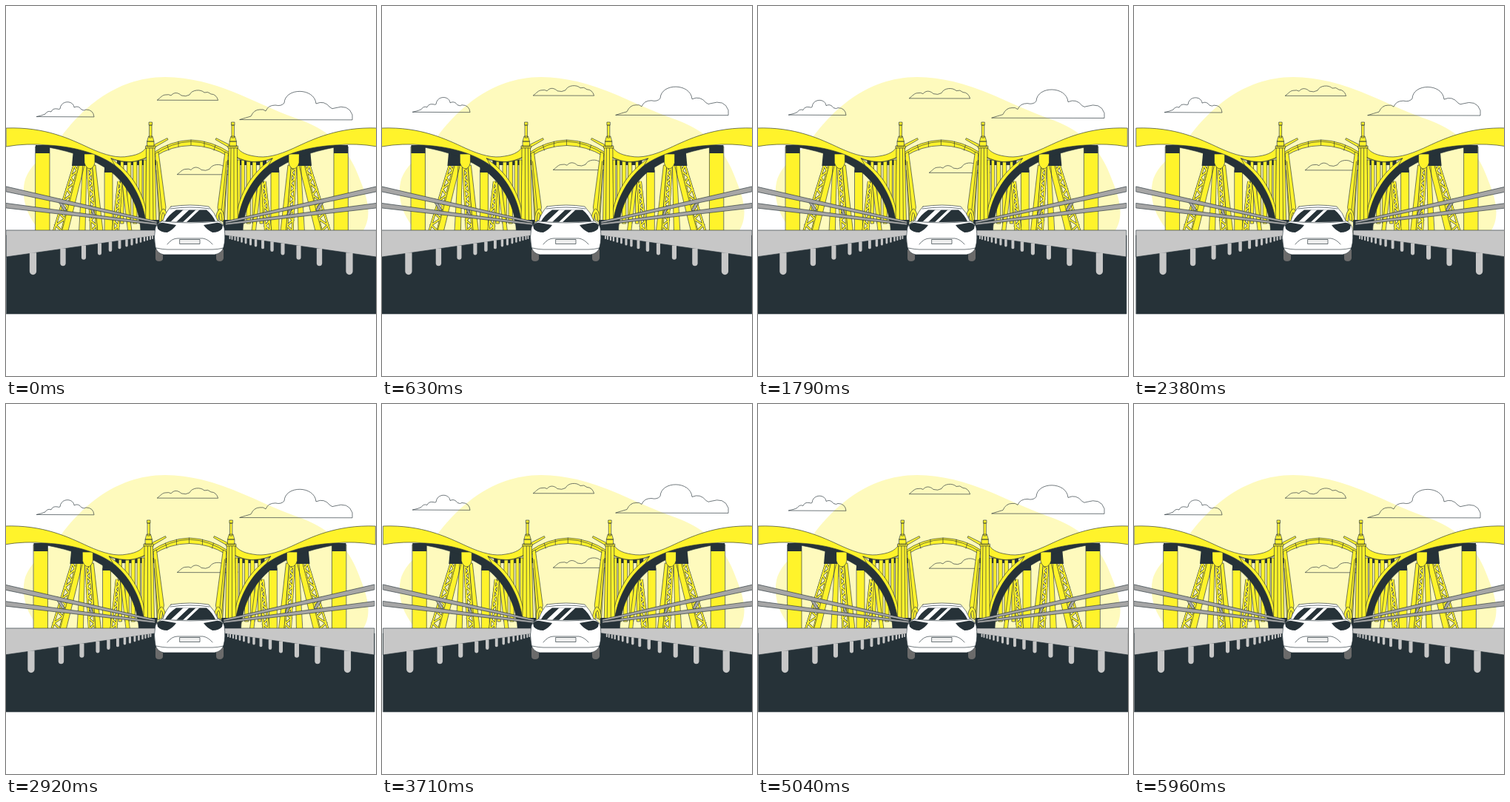
Recreate the animation shown at these times as an HTML page. Size 500x500 px, loop 6 s.

```html
<!DOCTYPE html>
<html lang="en">
<head>
<meta charset="utf-8">
<title>Bridge drive</title>
<style>
  html, body { margin: 0; width: 100%; height: 100%; overflow: hidden; background: #fff; }
  svg { display: block; width: 100vw; height: 100vh; }
  .line { stroke: #263238; stroke-width: .65; stroke-linejoin: round; stroke-linecap: round; }
  .y { fill: #fff32b; }
  .d { fill: #263238; }
  .g { fill: #c7c7c7; }
  .r { fill: #a6a6a6; }
  .n { fill: none; }
</style>
</head>
<body>
<svg viewBox="0 0 500 500">
  <defs>
    <g id="side">
      <!-- hangers beside the tower -->
      <path class="d" d="M150 208H203V215H150Z"/>
      <g id="hangers" class="y line"></g>
      <path class="y line" d="M202 199L206 197L216 272L213 290H207Z"/>
      <path class="line n" d="M204 210L211 280M203 222L208 285"/>
      <path class="y line" d="M207 291Q207 276 213 274Q218 277 219 291H215Q215 280 212 279Q210 282 210 291Z"/>
      <!-- pillars and trusses -->
      <path class="y line" d="M40 190H59V304H40ZM133.500 222H144V304H133.500Z"/>
      <path class="d" d="M40 188H59V199H40ZM133 214H144.500V225H133Z"/>
      <g id="trusses"></g>
      <path class="y line" d="M104 215H109L107 304H99ZM99 215H106L84 304H76Z"/>
      <path class="y line" d="M117 215H121L131 304H124ZM157 236H161L170 304H165Z"/>
      <path class="d" d="M91 194L110 198L107 216H89Z"/>
      <path class="d line" d="M58 188C92 188 125 199 148 216C174 236 190 268 191 304H182C181 272 164 242 142 224C119 207 90 197 58 191Z"/>
      <path class="y line" d="M106 200H120V212Q118 220 113 220Q108 219 106 212Z"/>
      <!-- main band -->
      <path class="y line" d="M.5 165C53 163 87 180 113 192C135 202 151 206 166 203C180 201 188 196 191 188L201 193Q196 206 176 210Q160 212 142 206L151 213C177 234 191 264 193 302H190C188 267 172 235 147 215C122 198 91 190 57 188Q28 185 .500 190Z"/>
      <path class="line n" d="M142 206L147 215M142 206Q165 218 195 202"/>
      <!-- tower -->
      <path class="y line" d="M190 190H201L203 290H189Z"/>
      <path class="line n" d="M194 192V290M198 192L199 290"/>
      <path class="y line" d="M199 188L218 178.500L219 180.500L201 191Z"/>
      <path class="y line" d="M194 161H197V178H194ZM193.500 157H197.500V161H193.500ZM193 176H198L200 183H191ZM191 183H200V190H191ZM189 189H202V192H189Z"/>
    </g>
    <g id="rail">
      <path class="d" d="M184 289H207V311H184Z"/>
      <path class="r line" d="M69 261L73 261L82 276L79 277ZM113 270L116 270L121 283H118Z"/>
      <path class="r line" d="M.5 244L204 291V293.500L.5 251Z"/>
      <path class="r line" d="M.5 266.500L204 293.500V296L.5 273Z"/>
      <path class="g line" d="M.5 303H207V309.500L.5 339Z"/>
      <g id="posts" class="g"></g>
    </g>
    <path id="wisp" class="line n" d="M204.500 127C209 124 211 120 216 120Q220 119 223 121C228 115 234 118 237 121Q243 123 248 120C251 113 263 112 268 117Q273 115 277 119Q284 119 286.500 127Z"/>
    <clipPath id="glass"><path d="M230 275.500H271Q279 282 283 291Q249 293 215 291Q220 282 230 275.500Z"/></clipPath>
  </defs>

  <path fill="#fefabd" d="M50 308C30 288 20 262 25 238C31 213 56 201 75 176C99 144 145 96 215 96C285 97 332 130 390 151C444 169 465 198 478 234C492 268 494 288 480 308Z"/>

  <g id="clouds">
    <path class="line n" d="M41.500 149.500Q49 148 53 146Q56 141 61 143Q63 138 69 139Q72 140 73 139C74 127 91 127 92 137Q98 134 102 140Q106 142 108 140Q118 140 119 149.500Z"/>
    <path class="line n" d="M316 153.500Q324 151 331 149Q335 140 343 140Q348 139 351 142Q354 134 364 134Q372 136 376 131C377 110 417 110 419 132Q430 127 438 137Q441 140 444 138Q463 132 468 147V153.500Z"/>
    <use href="#wisp"/>
    <use href="#wisp" x="27" y="100.500"/>
  </g>

  <g id="bridge">
    <path class="y line" d="M198 199Q222 182 250.500 181Q279 182 304 199L300 203Q277 189 250.500 188.500Q223 189 202 203Z"/>
    <path class="line n" d="M200 201Q224 184 250.500 183Q277 184 302 201"/>
    <path class="line n" d="M218 188L220 195M233 183V190M250 181V188M268 183V190M283 188L281 195"/>
    <use href="#side"/>
    <use href="#side" transform="matrix(-1 0 0 1 502 0)"/>
    <path class="d line" d="M.5 310H500.500V416H.5Z"/>
    <use href="#rail"/>
    <use href="#rail" transform="matrix(-1 0 0 1 500.500 0)"/>
  </g>

  <g id="car">
    <path fill="#6b6b6b" d="M202 329H212V342Q211 345 207 345Q202 345 202 341ZM284 329H294V341Q293 345 289 345Q284 345 284 341Z"/>
    <path fill="#fff" class="line" d="M223 271Q249 267 274 271Q282 279 286 290Q294 294 295 300Q297 315 294 326Q292 334 282 336H213Q204 334 202 326Q199 312 202 299Q204 294 212 290Q216 278 223 271Z"/>
    <path class="line n" d="M222 274Q249 270 275 274M212 291Q249 295 286 291"/>
    <g clip-path="url(#glass)">
      <path class="d" d="M210 270H290V295H210Z"/>
      <path fill="#fff" d="M222 292L240 275H248L230 292ZM239 292L257 275H262L244 292Z"/>
    </g>
    <path class="d" d="M204 296Q208 292 213 293L230 296Q226 302 218 306Q209 306 205 301ZM293 296Q289 292 284 293L267 296Q271 302 279 306Q288 306 292 301Z"/>
    <path class="line n" d="M218 322Q224 314 232 314H266Q273 315 279 322M203 327Q212 329 218 329H279Q286 329 294 327"/>
    <path fill="#eee" class="line" d="M235 315.500H262V321.500H235Z"/>
  </g>
</svg>
<script>
const $ = id => document.getElementById(id);
const mix = (a, b, t) => a + (b - a) * t;

// Tapering lattice leg between two horizontal ends
function truss(x1, y1, w1, x2, y2, w2, n) {
  let zig = "";
  for (let i = 0; i <= n; i++) {
    const t = i / n, w = mix(w1, w2, t) / 2;
    zig += `${i ? "L" : "M"}${mix(x1, x2, t) + (i % 2 ? w : -w)} ${mix(y1, y2, t)}`;
  }
  const edge = s => `M${x1 + s * w1 / 2} ${y1}L${x2 + s * w2 / 2} ${y2}`;
  const d = zig + edge(-1) + edge(1);
  return `<path d="${d}" fill="none" stroke="#263238" stroke-width="3"/>
          <path d="${d}" fill="none" stroke="#fff32b" stroke-width="1.900"/>`;
}

$("trusses").innerHTML =
  truss(95, 215, 6, 70, 304, 11, 11) +
  truss(113, 218, 5, 119, 304, 8, 12) +
  truss(154, 237, 4, 148, 304, 7, 10);

$("hangers").innerHTML = [[155, 4], [164, 5], [172, 5], [180, 4], [186, 4]]
  .map(([x, w]) => `<path d="M${x} 208h${w}V294h${-w}Z"/>`).join("");

$("posts").innerHTML = [36.5, 77, 105, 126.5, 141, 153.5, 163, 170, 176.5, 182, 187, 191, 195, 198]
  .map(x => {
    const far = 205 - x, w = 1.5 + far * .046, top = 338.5 - x * .143;
    const r = w / 2, low = 313 + far * .298 - r;
    return `<path d="M${x - r} ${top}V${low}A${r} ${r} 0 0 0 ${x + r} ${low}V${top}Z"/>`;
  }).join("");

// Cubic bezier (.25, .1, .25, 1)
function ease(x) {
  const curve = (a, b, t) => 3 * a * t * (1 - t) ** 2 + 3 * b * t * t * (1 - t) + t ** 3;
  let lo = 0, hi = 1;
  for (let i = 0; i < 20; i++) {
    const m = (lo + hi) / 2;
    if (curve(.25, .25, m) < x) lo = m; else hi = m;
  }
  return curve(.1, 1, lo);
}

const shake = [0, -1, 2, -4, 4, -4, 4, -4, 2, -1, 0];

function draw(now) {
  const t = now % 6000, k = Math.floor(t / 600);
  const dx = .65 * mix(shake[k], shake[k + 1], ease(t / 600 - k));
  const dy = -3.25 * (1 - Math.cos((t + 20) / 1500 * 2 * Math.PI));
  $("bridge").setAttribute("transform", `translate(${dx} 0)`);
  $("clouds").setAttribute("transform", `translate(0 ${dy})`);
}

const start = performance.now();
function tick() {
  draw(performance.now() - start);
  requestAnimationFrame(tick);
}
tick();
</script>
</body>
</html>
```
